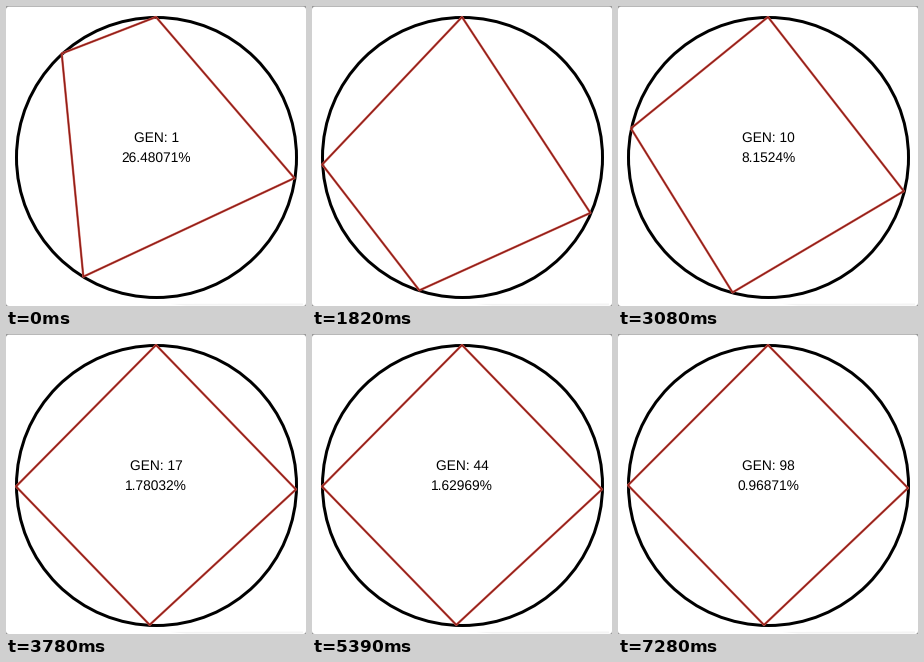
A matplotlib script for the animation above (7980 ms loop, 300 px wide and 300 px high).

```python
import numpy as np
import matplotlib.pyplot as plt
from matplotlib.animation import FuncAnimation
from matplotlib.patches import Circle, FancyBboxPatch, Polygon

SIZE, DPI = 300, 72          # at 72 dpi one point is one pixel
STEP, FRAMES = 70, 114
RADIUS = 140

# a few milestones: generation and the first three arcs of its shape in degrees
GENS = [1, 3, 10, 17, 44, 76, 98]
ARCS = np.array([
    (42.334722, 106.4, 112.6),
    (93.07, 69.2, 84.2),
    (78.2, 87.12568, 90.55),
    (90.6, 86.795424, 90.8),
    (90.6, 87.066558, 90.53),
    (90.3, 87.710058, 90.35),
    (90.1, 88.256322, 90.4),
])

# the first generations arrive after ever shorter waits, later ones steadily
EARLY = 17
WAITS = 25 / np.arange(2, EARLY) ** 1.08
ARRIVALS = 0.9 + np.concatenate([[0], np.cumsum(WAITS)])


def generation(i):
    if i <= ARRIVALS[-1]:
        return 1 + int(np.searchsorted(ARRIVALS, i, side="right"))
    return round(float(np.interp(i, [54, 77, 93, 104], GENS[3:])))


def best_arcs(gen):
    """Half of the way to the next milestone is taken in one jump."""
    place = np.interp(gen, GENS, range(len(GENS)))
    place = np.floor(place * 2) / 2
    return np.array([np.interp(place, range(len(GENS)), a) for a in ARCS.T])


def corners(arcs):
    a = np.radians(np.concatenate([[0], np.cumsum(arcs)]))
    return np.column_stack([150 - RADIUS * np.sin(a), 151 - RADIUS * np.cos(a)])


def error(arcs):
    """Mean deviation of the four arcs from a right angle, in percent."""
    full = np.append(arcs, 360 - sum(arcs))
    return np.abs(full - 90).sum() / 3.6


plt.rcParams["text.hinting"] = "none"
fig = plt.figure(figsize=(SIZE / DPI, SIZE / DPI), dpi=DPI, facecolor="#9a9a9a")
ax = fig.add_axes([0, 0, 1, 1])
ax.set_xlim(0, SIZE)
ax.set_ylim(SIZE, 0)
ax.axis("off")

# window with rounded corners and a faint strip at its lower edge
ax.add_patch(FancyBboxPatch((0, 0.7), SIZE, SIZE - 0.7, fc="white", ec="none",
                            boxstyle="round,pad=0,rounding_size=3"))
ax.add_patch(Polygon([(165, 298), (297, 297.5), (297, 299.5), (180, 299.5)],
                     fc="#f4f4f4", ec="none"))
ax.add_patch(Circle((150.5, 151.5), RADIUS, fill=False, ec="black", lw=3))


def outline(color, width):
    shape = Polygon(corners(ARCS[0]), fill=False, ec=color, lw=width,
                    joinstyle="round", zorder=3)
    return ax.add_patch(shape)


def label(y):
    return ax.text(150.2, y, "", family="Liberation Sans", size=13.7,
                   color="black", ha="center", va="baseline", zorder=5)


shapes = [outline("#d0645b", 2.3), outline("#8f1d17", 1.3)]
gen_label, err_label = label(136.3), label(156.3)


def draw(i):
    gen = generation(i)
    arcs = best_arcs(gen)
    for s in shapes:
        s.set_xy(corners(arcs))
    # the slow early generations start with a blank label
    blank = 1 < gen < 9 and gen != generation(i - 1)
    number = f"{error(arcs):.5f}".rstrip("0")
    gen_label.set_text("" if blank else f"GEN: {gen}")
    err_label.set_text("" if blank else f"{number}%")
    return [*shapes, gen_label, err_label]


anim = FuncAnimation(fig, draw, frames=FRAMES, interval=STEP,
                     init_func=lambda: draw(0), repeat=True, repeat_delay=0)
plt.show()
```
